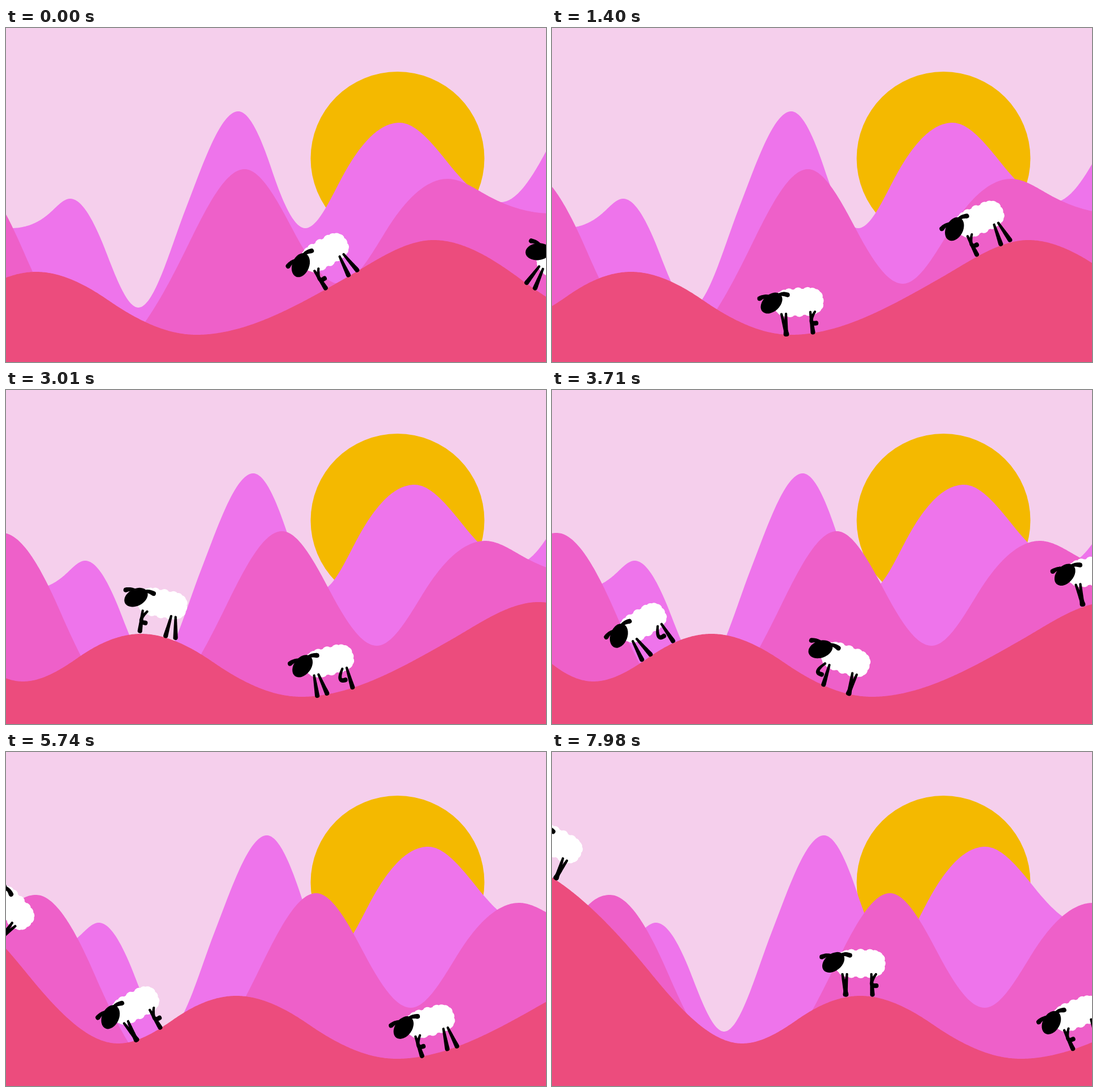
These frames come from a looping animation (951 px wide and 589 px high, 8000 ms). An HTML page with a canvas:

```html
<!DOCTYPE html>
<html lang="en">
<head>
<meta charset="utf-8">
<title>Sheep on the hills</title>
<style>
  html, body { margin: 0; width: 100%; height: 100%; overflow: hidden; background: #f5cfec; }
  canvas { display: block; width: 100vw; height: 100vh; }
</style>
</head>
<body>
<canvas id="stage" width="951" height="589"></canvas>
<script>
const ctx = document.getElementById('stage').getContext('2d');
const W = 951, H = 589, LOOP = 8000, STEP = 70, POSE_TIME = 106;

// Key points are [x, y] for peaks and valleys, [x, y, slope] on the flanks between them.
function heightAt(points, x) {
  const next = points.findIndex(p => x <= p[0]);
  if (next === 0) return points[0][1];
  if (next < 0) return points[points.length - 1][1];
  const [x0, y0, m0 = 0] = points[next - 1], [x1, y1, m1 = 0] = points[next];
  const d = x1 - x0, t = (x - x0) / d, u = 1 - t;
  return y0 + (y1 - y0) * t * t * (3 - 2 * t) + d * t * u * (m0 * u - m1 * t);
}

// Speed is the drift to the right in px/s.
function makeHill(color, speed, points) {
  const left = points[0][0], right = points[points.length - 1][0];
  const path = new Path2D();
  path.moveTo(left, 700);
  for (let x = left; x <= right; x += 2) path.lineTo(x, heightAt(points, x));
  path.lineTo(right, 700);
  return { color, speed, points, path };
}

const back = makeHill('#ee74eb', 8.77, [
  [-80, 353], [8, 353], [75, 328, -0.85], [113, 301], [177, 397, 2.6], [233, 493],
  [316, 320, -2.6], [409, 147], [468, 250, 3], [527, 353], [593, 261, -1.85],
  [693, 167], [781, 241, 1.25], [872, 307], [954, 212, -1.9]
]);
const middle = makeHill('#ee60c9', 21.93, [
  [-220, 430], [-138, 310, -2], [-73, 252], [30, 392, 2.3], [165, 580],
  [320, 384, -2.05], [420, 249], [502, 350, 1.9], [587, 451],
  [669, 358, -1.62], [778, 266], [847, 295, 0.55], [960, 327]
]);
const front = makeHill('#ec4c7d', 61.4, [
  [-600, 185], [-316, 390, 1.23], [-155, 514], [-58, 472, -0.7], [53, 430],
  [180, 480, 0.69], [335, 541], [598, 441, -0.57], [753, 374],
  [905, 442, 0.74], [1080, 520]
]);

// Place on the ground at time zero and walking speed in px/s.
const flock = [
  { x: 590, speed: -108 },
  { x: 945, speed: -120.4 },
  { x: 1323, speed: -97.7 },
  { x: 1507, speed: -70.3 }
];

function dot(x, y, r) {
  ctx.moveTo(x + r, y);
  ctx.arc(x, y, r, 0, 7);
}

// A tapering curve from (x0, y0) to (x1, y1).
function limb(x0, y0, cx, cy, x1, y1) {
  ctx.beginPath();
  for (let t = 0; t <= 1; t += 0.04) {
    const u = 1 - t;
    dot(u * u * x0 + 2 * u * t * cx + t * t * x1,
        u * u * y0 + 2 * u * t * cy + t * t * y1, 2.2 + 2 * t);
  }
  ctx.fill();
}

// Two legs half a cycle apart: one swings up while the other stands.
function drawLegPair(hip, beat) {
  for (const side of [-1, 1]) {
    const angle = (beat + side) * Math.PI / 2;
    const lift = 17 * Math.max(0, Math.sin(angle));
    const top = hip + 4 * side, foot = top + 2 + 5 * Math.cos(angle);
    limb(top, 19, (top + foot) / 2 - lift, 38 + lift / 5, foot, 56 - lift);
  }
}

function drawWool() {
  const bend = v => Math.sign(v) * Math.abs(v) ** 0.65;
  ctx.fillStyle = '#fff';
  ctx.beginPath();
  ctx.roundRect(-42, -23, 84, 46, 20);
  for (let a = 0; a < 2 * Math.PI; a += Math.PI / 10)
    dot(35 * bend(Math.cos(a)), 17 * bend(Math.sin(a)), 9);
  ctx.fill();
}

function drawSheep(x, y, angle, beat) {
  ctx.save();
  ctx.translate(x, y);
  ctx.rotate(angle);
  ctx.translate(0, -57);
  drawWool();
  ctx.fillStyle = '#000';
  drawLegPair(-28, beat);
  drawLegPair(23, beat - 1);
  ctx.beginPath();
  ctx.ellipse(-48, -2, 22, 15, -0.68, 0, 7);
  ctx.fill();
  limb(-50, -14, -60, -16, -69, -11);
  limb(-38, -13, -30, -19, -18, -14);
  ctx.restore();
}

function drawHill({ color, speed, path }, t) {
  ctx.save();
  ctx.translate(speed * t, 0);
  ctx.fillStyle = color;
  ctx.fill(path);
  ctx.restore();
}

function draw(ms) {
  const t = ms / 1000;
  ctx.fillStyle = '#f5cfec';
  ctx.fillRect(0, 0, W, H);
  ctx.fillStyle = '#f4b900';
  ctx.beginPath();
  dot(689.5, 230, 153);
  ctx.fill();
  [back, middle, front].forEach(hill => drawHill(hill, t));

  const beat = Math.floor(ms / POSE_TIME + 0.5);
  flock.forEach(({ x, speed }, i) => {
    const sheepX = x + speed * t;
    const ground = offset => heightAt(front.points, sheepX - front.speed * t + offset);
    const angle = Math.atan2(ground(20) - ground(-20), 40);
    drawSheep(sheepX, ground(0), angle, beat - i);
  });
}

const start = performance.now();
function tick() {
  const ms = (performance.now() - start) % LOOP;
  draw(Math.floor(ms / STEP) * STEP);
  requestAnimationFrame(tick);
}
tick();
</script>
</body>
</html>
```
